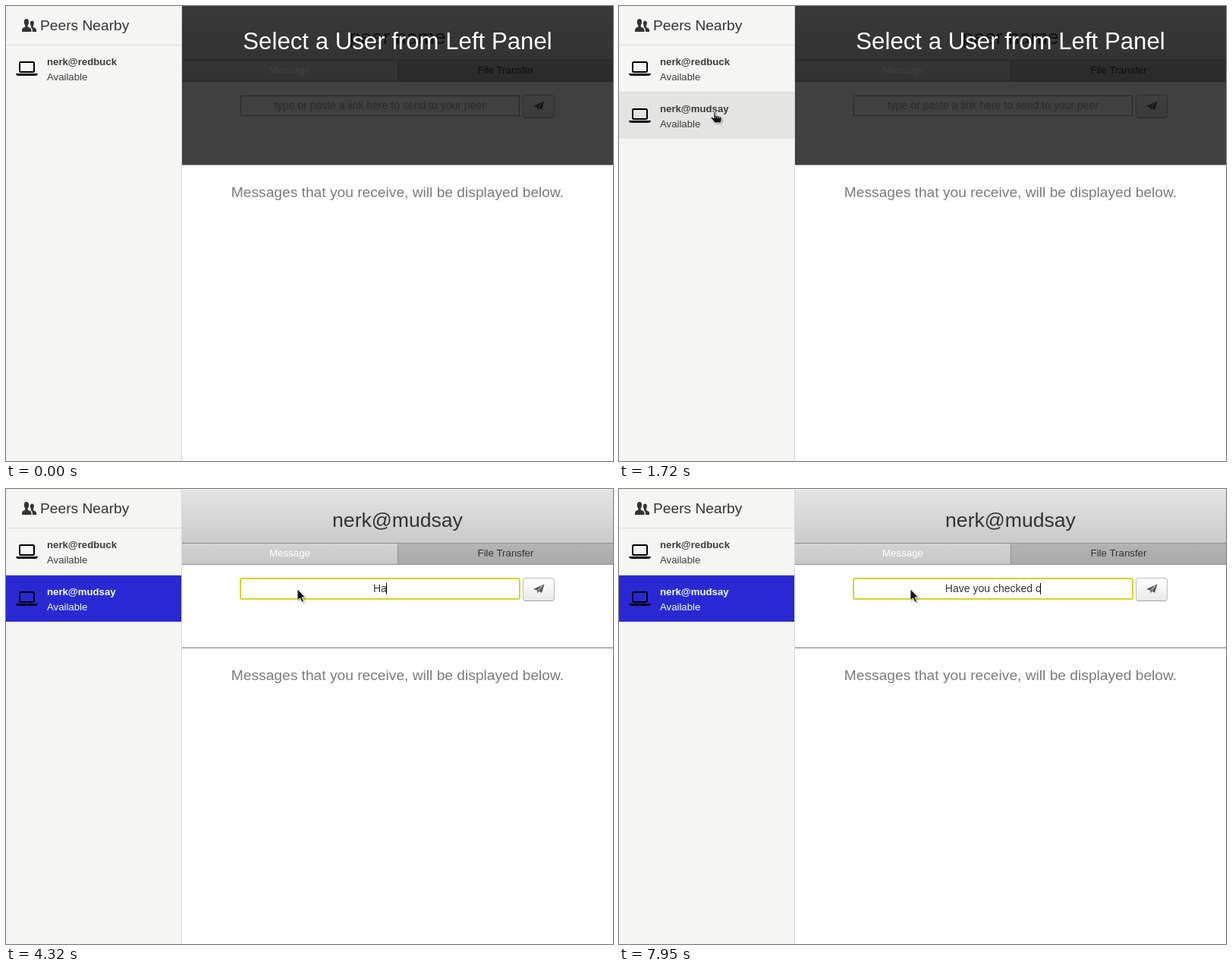
These frames come from a looping animation (800x600 px, 8000 ms). An HTML page:

```html
<!DOCTYPE html>
<html lang="en">
<head>
<meta charset="utf-8">
<title>Peers Nearby</title>
<style>
html, body { margin: 0; width: 100%; height: 100%; overflow: hidden; background: #fff; }
#stage { position: relative; width: 800px; height: 600px; overflow: hidden; background: #fff;
  font-family: "Liberation Sans", Arial, sans-serif; color: #333; }
#stage div, #stage svg, #stage b { position: absolute; box-sizing: border-box; white-space: pre; }
.mid { left: 0; width: 100%; text-align: center; }
.s13 { font-size: 13.2px; line-height: 15px; }
.s19 { font-size: 19.2px; line-height: 21px; }

/* left panel */
#side { left: 0; top: 0; width: 232px; height: 600px; overflow: hidden;
  background: #f5f5f4; border-right: 1px solid #d6d6d6; }
#side .head { left: 0; top: 0; width: 231px; height: 52px; border-bottom: 1px solid #dcdcdc; }
.peer { left: 0; width: 231px; height: 62px; border-top: 1px solid transparent; color: #3c3c3c; }
.peer .name { left: 54px; top: 14px; font-weight: bold; }
.peer .state { left: 54px; top: 34px; }
.peer svg { left: 13px; top: 21px; }
#first { top: 51px; animation: hover1 8s step-end infinite; }
#second { top: 113px; border-top-color: #dcdcdc; background-clip: padding-box;
  animation: slide 8s infinite, hover2 8s step-end infinite; }
#second .name, #second .state { animation: whiten 8s step-end infinite; }
#bar { left: 0; top: 585px; width: 231px; height: 15px; background: #f1f1f1;
  animation: bar 8s step-end infinite; }
#bar div { left: 14px; top: 2px; width: 30px; height: 11px; background: #c1c1c1; }

/* right panel */
#main { left: 232px; top: 0; width: 568px; height: 600px; }
#main .head { left: 0; top: 0; width: 568px; height: 72px; border-top: 1px solid #f2f2f2;
  border-bottom: 1px solid #8e8e8e; background: linear-gradient(#e4e4e4, #cacaca); }
.title { top: 26px; font-size: 26.6px; line-height: 30px; }
.tab { top: 72px; height: 28px; border-bottom: 1px solid #8e8e8e; text-align: center;
  font-size: 13.3px; line-height: 15px; padding-top: 5px; }
#chat { left: 0; width: 285px; color: #fff; background: linear-gradient(#d2d2d2, #c8c8c8);
  border-right: 1px solid #8e8e8e; }
#files { left: 285px; width: 283px; background: linear-gradient(#b4b4b4, #aaa); }
#field { left: 77px; top: 118px; width: 368px; height: 27px; border: 1px solid #9c9c9c; background: #fff; }
#focus { left: 76px; top: 117px; width: 370px; height: 29px; border: 2px solid #d4d42c; border-radius: 3px; }
.entry { left: 76.9px; top: 123px; width: 368px; text-align: center; font-size: 14px; line-height: 16px; }
#hint { color: #a9a9a9; }
#typed { position: relative; display: inline-block; height: 16px; }
#stage #caret { left: calc(100% - .5px); top: 1px; width: 1px; height: 15px; background: #000; }
#send { left: 449px; top: 117px; width: 42px; height: 31px; border: 1px solid #bdbdbd;
  border-bottom-color: #a2a2a2; border-radius: 4px; background: linear-gradient(#fff, #e9e9e9); }
#rule { left: 0; top: 209px; width: 568px; height: 1px; background: #777; }
#shade { left: 0; top: 0; width: 568px; height: 209px; background: rgba(0,0,0,.75); color: #fff; }
#shade div { top: 29px; font-size: 31.2px; line-height: 35px; }
.before { animation: before 8s step-end infinite; }
.after { animation: after 8s step-end infinite; }
#focus { animation: focus 8s step-end infinite; }
#hint { animation: hint 8s step-end infinite; }

/* pointer: origin is the hot spot */
#pointer { left: 0; top: 0; overflow: visible; width: 1px; height: 1px; animation: move 8s infinite;
  filter: drop-shadow(1px 1px 1px rgba(0,0,0,.35)); }
#hand { animation: hand 8s step-end infinite; }
#arrow { animation: arrow 8s step-end infinite; }

@keyframes slide {
  0%, 6.4% { transform: translateX(2000px); opacity: 0; animation-timing-function: ease; }
  13.9% { transform: translateX(-30px); opacity: 1; animation-timing-function: ease; }
  16.4% { transform: translateX(10px); animation-timing-function: ease; }
  18.9%, 100% { transform: none; opacity: 1; }
}
@keyframes bar { 0%, 19.5%, 100% { visibility: hidden; } 6.25% { visibility: visible; } }
@keyframes hover1 { 0%, 20.8%, 100% { background-color: transparent; } 19.9% { background-color: #e4e4e3; } }
@keyframes hover2 {
  0% { background-color: transparent; }
  20.8% { background-color: #e4e4e3; }
  30.5%, 100% { background-color: #2929d4; }
}
@keyframes whiten { 0% { color: #3c3c3c; } 27.375%, 100% { color: #f0ffff; } }
@keyframes before { 0% { visibility: visible; } 27.375%, 100% { visibility: hidden; } }
@keyframes after { 0% { visibility: hidden; } 27.375%, 100% { visibility: visible; } }
@keyframes focus { 0% { visibility: hidden; } 38.125%, 100% { visibility: visible; } }
@keyframes hint { 0% { visibility: visible; } 42.75%, 100% { visibility: hidden; } }
@keyframes move {
  0%, 18.95% { transform: translate(166px, 8px); visibility: hidden; }
  19% { transform: translate(166px, 8px); visibility: visible; animation-timing-function: linear; }
  20% { transform: translate(142px, 68px); animation-timing-function: ease-out; }
  21.5%, 29% { transform: translate(126px, 139px); animation-timing-function: ease-in-out; }
  33.625%, 100% { transform: translate(384px, 132px); visibility: visible; }
}
@keyframes hand { 0%, 30.5%, 100% { opacity: 0; } 19.9% { opacity: 1; } }
@keyframes arrow { 0%, 30.5%, 100% { opacity: 1; } 19.9% { opacity: 0; } }
</style>
</head>
<body>
<svg width="0" height="0" style="position:absolute">
  <symbol id="laptop" viewBox="0 0 29 20">
    <rect x="5" y="1" width="19" height="13" rx="1.5" fill="none" stroke="#000" stroke-width="2"/>
    <path d="M0 16H29Q28.500 19 26 19H3Q.500 19 0 16Z"/>
    <path d="M12.500 17.500h4" stroke="#555" stroke-width=".6"/>
  </symbol>
</svg>
<div id="stage">
  <div id="main">
    <div class="head"></div>
    <div class="mid title before">peer name</div>
    <div class="mid title after">nerk@mudsay</div>
    <div class="tab" id="chat">Message</div>
    <div class="tab" id="files">File Transfer</div>
    <div id="field"></div>
    <div id="focus"></div>
    <div class="entry" id="hint">type or paste a link here to send to your peer</div>
    <div class="entry"><span id="typed"><span id="text"></span><b id="caret"></b></span></div>
    <div id="send"><svg style="left:13px;top:7px" width="15" height="14">
      <path d="M0 7 14.500 .500 11 12 7.500 9.800 5.500 12.500 5 8.700Z" fill="#555"/>
      <path d="M5 8.700 12 2.500 7 9.500" fill="none" stroke="#e8e8e8" stroke-width=".7"/>
    </svg></div>
    <div id="rule"></div>
    <div class="mid s19" style="top:235px;color:#7b7b7b">Messages that you receive, will be displayed below.</div>
    <div id="shade" class="before"><div class="mid">Select a User from Left Panel</div></div>
  </div>

  <div id="side">
    <div class="head">
      <svg style="left:21px;top:17px" width="20" height="18" fill="#333">
        <path d="M6 0C8.300 0 9.300 1.800 9 4.500 8.900 6.500 8.200 7.800 7.700 8.500V10.500L11 12Q12.500 12.800 12.500 17H0Q0 12.800 1.200 12L4.300 10.500V8.500C3.700 7.800 2.900 6.500 2.800 4.500 2.600 1.800 3.700 0 6 0Z"/>
        <path d="M13.500 2.500C15.300 2.500 16 4 15.800 6 15.700 7.600 15.200 8.600 14.800 9.200V11L18 12.600Q19.200 13.300 19.200 17H14Q14 12.500 12 11.200L11.500 10.500Q12.200 10 12.100 9.200C11.600 8.600 11 7.600 10.900 6 10.800 4 11.700 2.500 13.500 2.500Z"/>
      </svg>
      <div class="s19" style="left:45px;top:15px">Peers Nearby</div>
    </div>
    <div class="peer s13" id="first">
      <svg width="29" height="20"><use href="#laptop"/></svg>
      <div class="name">nerk@redbuck</div><div class="state">Available</div>
    </div>
    <div class="peer s13" id="second">
      <svg width="29" height="20"><use href="#laptop"/></svg>
      <div class="name">nerk@mudsay</div><div class="state">Available</div>
    </div>
    <div id="bar"><div></div>
      <svg width="231" height="15"><path d="M9 4v8L5 8Z" fill="#a3a3a3"/><path d="M222 4v8l4-4Z" fill="#505050"/></svg>
    </div>
  </div>

  <svg id="pointer">
    <path id="arrow" d="M0 0V15L3.400 11.800 6 17.300 8.500 16.200 6 10.900H10.500Z" fill="#111" stroke="#fff" stroke-width=".9"/>
    <g id="hand">
      <path d="M-1 1Q0-.500 1.200 1V5.500L7 6.500Q9 7 9 9V12L8 15H0L-2 12-5 8.500Q-4.500 7-3 7.500L-1 9Z" fill="#111" stroke="#fff" stroke-width=".8"/>
      <path d="M1.500 8.500v-2M4 9v-2M6.500 9.300v-2" stroke="#fff" stroke-width=".7"/>
    </g>
  </svg>
</div>
<script>
const LOOP = 8000, BLINK = 490, FOCUS = 3050;
const line = "Have you checked c";
const keys = [3420, 4320, 4420, 4560, 4660, 4760, 4860, 4960, 5060,
  5860, 5960, 6060, 6150, 6250, 6460, 6610, 6700, 7950];
const slip = { from: 3530, to: 4090, char: "e" };   // mistyped, then erased
const edits = [FOCUS, slip.from, slip.to, ...keys];
const text = document.getElementById("text");
const caret = document.getElementById("caret");
let start;

function draw(now) {
  start ??= now;
  const t = (now - start) % LOOP;
  const slipped = t >= slip.from && t < slip.to;
  text.textContent = line.slice(0, keys.filter(k => k <= t).length) + (slipped ? slip.char : "");
  const last = Math.max(...edits.filter(e => e <= t));
  const lit = t >= FOCUS && Math.floor((t - last) / BLINK) % 2 === 0;
  caret.style.visibility = lit ? "visible" : "hidden";
  requestAnimationFrame(draw);
}
requestAnimationFrame(draw);
</script>
</body>
</html>
```
